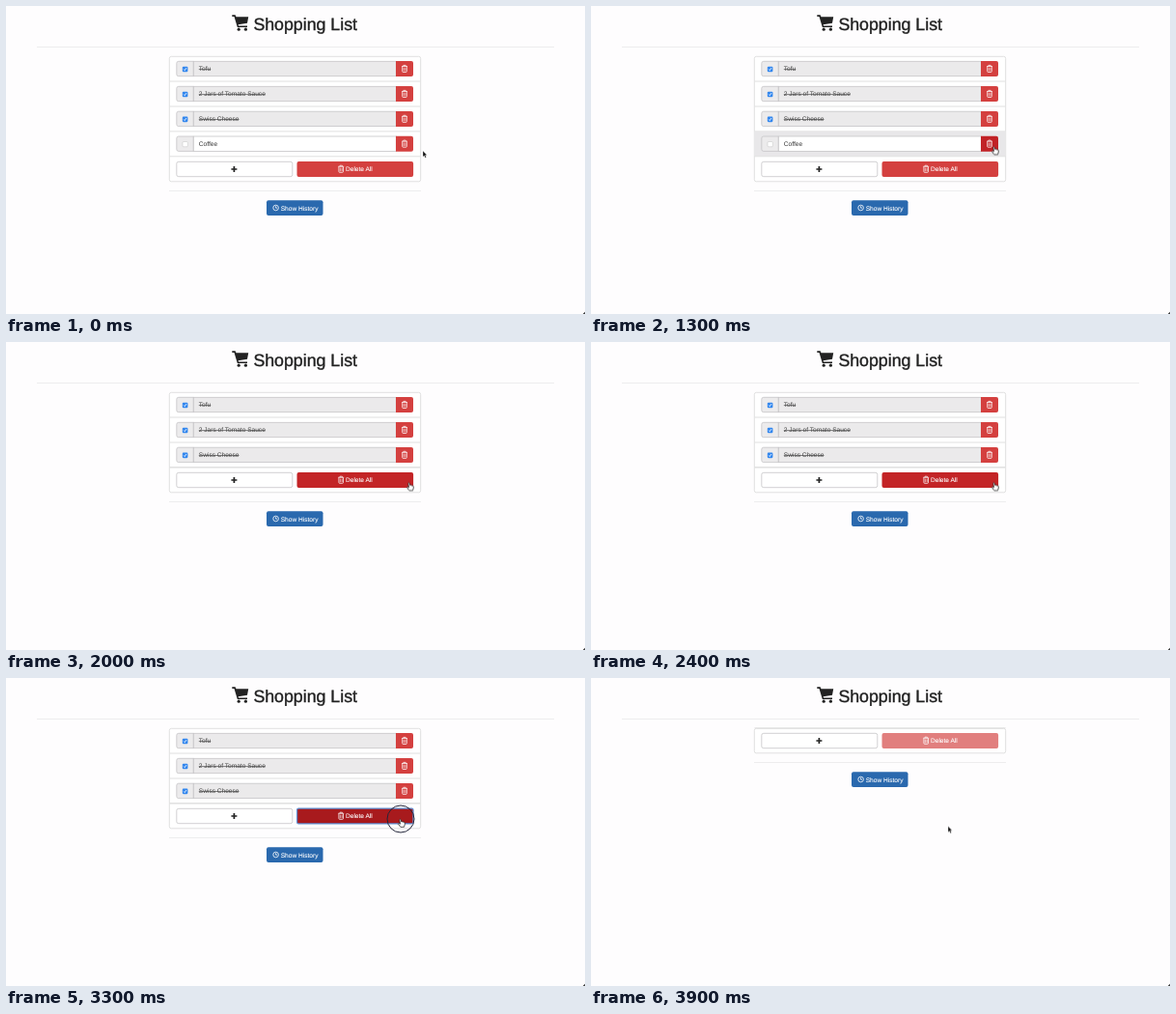
An HTML page for the animation above (4000 ms loop, 600 by 319 pixels).

```html
<!DOCTYPE html>
<html lang="en">
<head>
<meta charset="utf-8">
<title>Shopping List</title>
<style>
  html, body { margin: 0; width: 600px; height: 319px; overflow: hidden; background: #fefdfe; }
  svg { display: block; }
  text { font: 6.58px "Liberation Sans", Arial, sans-serif; text-rendering: geometricPrecision; fill: #333; }
  .title { font-size: 17.75px; fill: #222; stroke: #222; stroke-width: .4; }
  .done { text-decoration: line-through; fill: #444; }
  .light { fill: #fff; stroke: #fff; stroke-width: .1; }
  .line { stroke: #ddd; stroke-width: .9; fill: none; }
  .rule { stroke: #ededee; stroke-width: 1; }
  .box { stroke: #c6c5c7; stroke-width: .8; }
  .red { fill: #d4403f; }

  /* every change is a hard step on a 100 ms grid */
  .a { animation: 4s step-end infinite; }
  #cursor { animation-name: move; }
  #arrow { animation-name: arrow; }
  #hand { animation-name: hand; }
  #ring { animation-name: ring; }
  #hover { animation-name: hover; }
  #bin { animation-name: bin; }
  #coffee { animation-name: coffee; }
  #items { animation-name: items; }
  #footer { animation-name: rise; }
  #frame { animation-name: shrink; }
  #all { animation-name: all; }
  #focus { animation-name: focus; }

  @keyframes move {
    0% { transform: translate(432px, 150px); }
    2.5% { transform: translate(430px, 149px); }
    5% { transform: translate(420px, 145.5px); }
    7.5% { transform: translate(419px, 145px); }
    20% { transform: translate(418px, 145.5px); }
    62.5% { transform: translate(425px, 144px); }
    65% { transform: translate(452px, 140px); }
    67.5% { transform: translate(473px, 137.5px); }
    70% { transform: translate(478px, 137px); }
    72.5% { transform: translate(479px, 137px); }
    75% { transform: translate(460px, 139px); }
    77.5% { transform: translate(425px, 143px); }
    80%, 92.5% { transform: translate(409px, 146px); }
    95% { transform: translate(382px, 152px); }
    97.5%, 100% { transform: translate(370px, 153.5px); }
  }
  @keyframes arrow {
    0%, 62.5%, 87.5%, 100% { visibility: visible; }
    5%, 80% { visibility: hidden; }
  }
  @keyframes hand {
    0%, 62.5%, 87.5%, 100% { visibility: hidden; }
    5%, 80% { visibility: visible; }
  }
  @keyframes ring {
    0%, 50%, 87.5%, 100% { visibility: hidden; }
    47.5%, 82.5% { visibility: visible; }
  }
  @keyframes hover {
    0%, 50%, 100% { visibility: hidden; }
    5% { visibility: visible; }
  }
  @keyframes bin {
    0% { fill: #d4403f; }
    5% { fill: #c12226; }
    47.5%, 100% { fill: #a81a1d; }
  }
  @keyframes coffee {
    0% { visibility: visible; }
    50%, 100% { visibility: hidden; }
  }
  @keyframes items {
    0% { visibility: visible; }
    87.5%, 100% { visibility: hidden; }
  }
  @keyframes rise {
    0% { transform: translateY(0); }
    50% { transform: translateY(-26px); }
    87.5%, 100% { transform: translateY(-104px); }
  }
  @keyframes shrink {
    0% { height: 129.5px; }
    50% { height: 103.5px; }
    87.5%, 100% { height: 25.5px; }
  }
  @keyframes all {
    0%, 62.5% { fill: #d4403f; }
    50%, 80% { fill: #c32426; }
    82.5% { fill: #a81a1d; }
    87.5%, 100% { fill: #e17f7e; }
  }
  @keyframes focus {
    0%, 87.5%, 100% { visibility: hidden; }
    82.5% { visibility: visible; }
  }
</style>
</head>
<body>
<svg width="600" height="319" viewBox="0 0 600 319">
  <defs>
    <g id="trash" fill="none" stroke="#fff" stroke-width=".75">
      <path d="M-3-2.5H3M-1.2-2.6V-3.6H1.2V-2.6M-2.3-2.2V2.6Q-2.3 3.5-1.5 3.5H1.5Q2.3 3.5 2.3 2.6V-2.2"/>
      <path d="M-.9-1.2V2.4M.9-1.2V2.4" stroke-width=".65"/>
    </g>
    <path id="right" d="M404 57H420A2 2 0 0 1 422 59V71A2 2 0 0 1 420 73H404Z"/>
    <path id="addon" class="box" fill="#ecebec" d="M194.3 57.3H178.8A2 2 0 0 0 176.8 59.3V70.7A2 2 0 0 0 178.8 72.7H194.3Z"/>
    <g id="checked">
      <use href="#addon"/>
      <rect class="box" x="194.3" y="57.3" width="210" height="15.4" fill="#ebeaeb"/>
      <rect x="182.8" y="62.7" width="5.6" height="5.6" rx="1.1" fill="#3387ee"/>
      <path d="M184.2 65.6L185.2 66.7L187 64.1" fill="none" stroke="#fff" stroke-width=".85"/>
      <use href="#right" class="red"/>
      <use href="#trash" x="413" y="65"/>
      <path class="line" d="M169.5 78H429.5"/>
    </g>
  </defs>

  <g fill="#222">
    <path d="M234.3 9.2H237.6L238.5 11.2H251.2L250 17.7L240.6 19.3L241 20.4H250V22H239.8L236.5 10.9H234.3Z"/>
    <circle cx="241.2" cy="24.2" r="1.6"/>
    <circle cx="248.4" cy="24.2" r="1.6"/>
  </g>
  <text class="title" x="256.4" y="25.4">Shopping List</text>
  <path class="rule" d="M32 42.5H568"/>

  <rect id="frame" class="line a" x="169.3" y="52.3" width="260.4" height="129.5" rx="2" style="fill:#fff"/>

  <g id="items" class="a">
    <use href="#checked"/>
    <use href="#checked" y="26"/>
    <use href="#checked" y="51.9"/>
    <text class="done" x="199.8" y="67.4">Tofu</text>
    <text class="done" x="199.8" y="93.4">2 Jars of Tomato Sauce</text>
    <text class="done" x="199.8" y="119.3">Swiss Cheese</text>
  </g>

  <g id="coffee" class="a">
    <rect id="hover" class="a" x="169.5" y="130" width="260" height="25.5" fill="#e8e7e9"/>
    <g transform="translate(0 77.7)">
      <use href="#addon"/>
      <rect class="box" x="194.3" y="57.3" width="210" height="15.4" fill="#fff"/>
      <rect x="183" y="62.8" width="5.3" height="5.3" rx="1" fill="#fff" stroke="#c9c9c9" stroke-width=".6"/>
      <use id="bin" class="red a" href="#right"/>
      <use href="#trash" x="413" y="65"/>
      <text x="199.8" y="67.4">Coffee</text>
    </g>
  </g>

  <g id="footer" class="a">
    <path class="line" d="M169.5 155.8H429.5"/>
    <rect class="box" x="176.8" y="161.3" width="120" height="15.4" rx="2" fill="#fff"/>
    <path d="M233.4 169H239.4M236.4 166V172" stroke="#222" stroke-width="1.7"/>
    <rect id="all" class="red a" x="301.5" y="161" width="120.6" height="16" rx="2"/>
    <rect id="focus" class="a" x="301.6" y="161.1" width="120.4" height="15.8" rx="1.5" fill="none" stroke="#5f8fd2" stroke-width="1.2"/>
    <use href="#trash" x="347.2" y="168.8"/>
    <text class="light" x="352" y="171.4">Delete All</text>
    <path class="rule" d="M169 191.5H430"/>
    <rect x="270" y="201.2" width="58.5" height="15.8" rx="2" fill="#2a69ae"/>
    <g fill="none" stroke="#fff" stroke-width=".8">
      <circle cx="279.6" cy="209" r="2.8"/>
      <path d="M279.6 207.2V209.2H281"/>
    </g>
    <text class="light" x="284.7" y="211.5">Show History</text>
  </g>

  <path d="M600 316.8V319H597.8Z" fill="#333"/>

  <g id="cursor" class="a">
    <circle id="ring" class="a" r="14" fill="none" stroke="#23263a" stroke-width="1"/>
    <path id="arrow" class="a" d="M0 0V6.2L1.4 5L2.4 7.3L3.5 6.8L2.5 4.6H4.3Z" fill="#111" stroke="#fff" stroke-width=".35"/>
    <path id="hand" class="a" d="M-1.2 .8Q-.4-.2 .2 .9L.8 3L1.6 2.8L2.5 3.1L3.3 3.2L4.2 3.8L4.3 5.7L3.5 8.3H-.2L-2.6 5.2Q-2.3 4.1-1.2 4.9L-.5 5.2Z" fill="#fff" stroke="#222" stroke-width=".75" stroke-linejoin="round"/>
  </g>
</svg>
</body>
</html>
```
